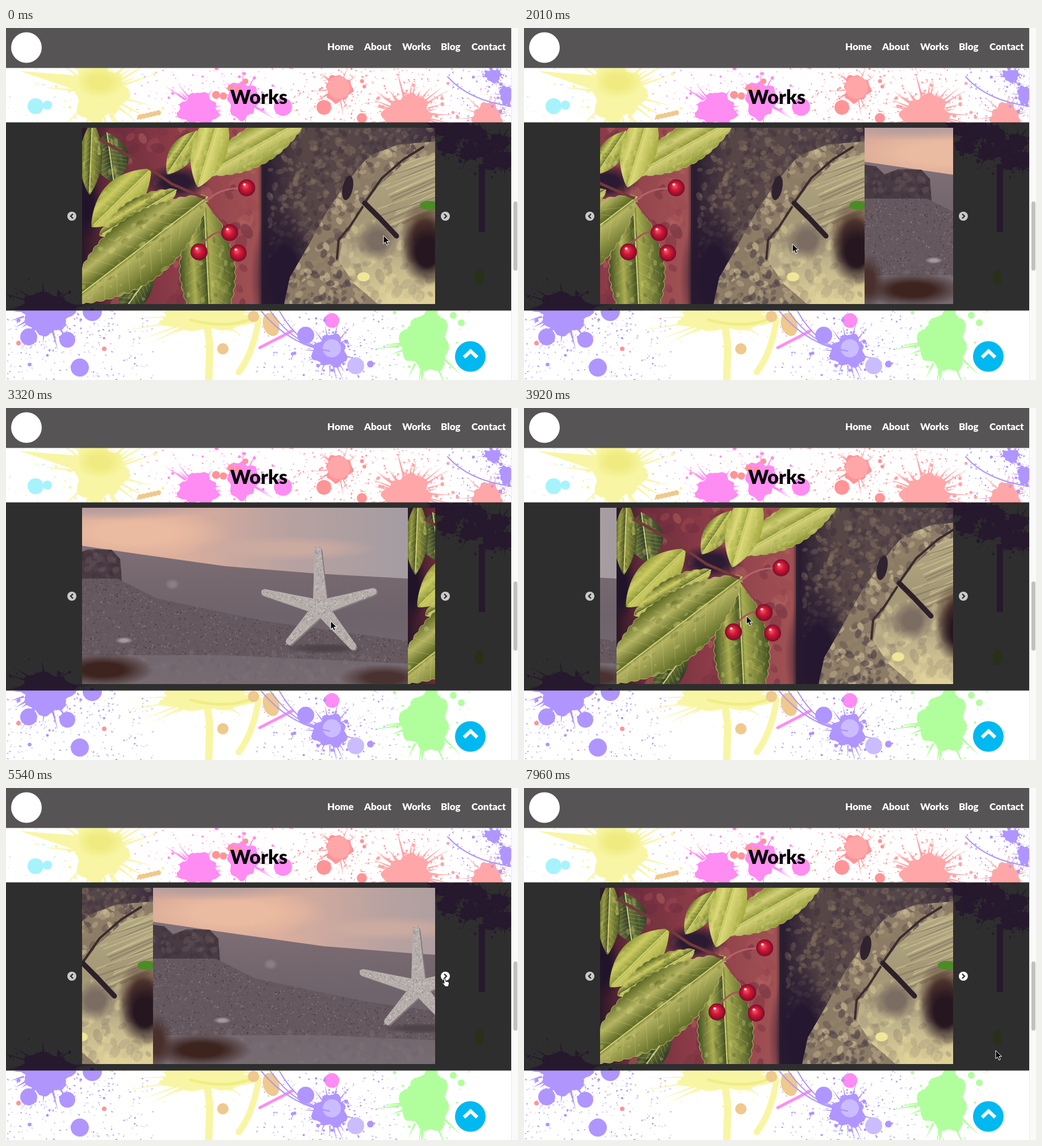
Recreate the animation shown at these times as an HTML page with a canvas. Size 902x621 px, loop 8 s.

```html
<!DOCTYPE html>
<html lang="en">
<head>
<meta charset="utf-8">
<title>Works</title>
<style>
  html, body { margin: 0; width: 100%; height: 100%; overflow: hidden; background: #fff; }
  canvas, svg { position: absolute; left: 0; top: 0; display: block; }
  text { font-family: Lato, "Open Sans", sans-serif; font-weight: 900; }
  .nav { font-size: 17px; fill: #fff; }
</style>
</head>
<body>
<canvas id="stage" width="902" height="621"></canvas>
<svg width="902" height="621" viewBox="0 0 902 621">
  <rect width="890" height="70.500" fill="#565454"/>
  <circle cx="36" cy="34.500" r="27" fill="#fff"/>
  <g class="nav">
    <text x="566" y="39">Home</text>
    <text x="631" y="39">About</text>
    <text x="698" y="39">Works</text>
    <text x="766" y="39">Blog</text>
    <text x="820" y="39">Contact</text>
  </g>
  <text x="445.500" y="133.500" font-size="34" text-anchor="middle">Works</text>
  <g fill="none" stroke="#2e2e2e" stroke-width="2.400">
    <circle cx="116" cy="332" r="8" fill="#cbcbcb" stroke="none"/>
    <path d="M118 328l-4 4 4 4"/>
    <circle id="next" cx="774" cy="332" r="8" stroke="none"/>
    <path d="M772 328l4 4-4 4"/>
  </g>
  <circle cx="818" cy="579.500" r="27" fill="#00b9f0"/>
  <path d="M807 581l11.500-11 11.500 11" fill="none" stroke="#fff" stroke-width="6"/>
  <rect x="890" width="12" height="621" fill="#fafafa"/>
  <rect x="890" width="1" height="621" fill="#ebebeb"/>
  <rect x="894" y="306" width="7" height="122" rx="3.500" fill="#c1c1c1"/>
  <path id="arrow" d="M0 0v14.500l3.300-3 2.400 5.500 2.600-1.100-2.400-5.400h4.600z" fill="#000" stroke="#fff"/>
  <path id="hand" d="M2 1q1.500-1.500 2.500 0l1 5 5 1q1.500 1 1 4l-1.500 4.500h-5l-5-6q0-2 3 0z" fill="#fff" stroke="#111"/>
</svg>
<script>
const $ = id => document.getElementById(id);
const TAU = Math.PI * 2;
let g, seed;
const rand = () => (seed = seed * 16807 % 2147483647) / 2147483647;
const pick = list => list[Math.floor(rand() * list.length)];
const mix = (a, b, k) => a + (b - a) * k;

function layer(w, h, start, draw) {
  const canvas = document.createElement('canvas');
  canvas.width = w;
  canvas.height = h;
  g = canvas.getContext('2d');
  g.lineCap = g.lineJoin = 'round';
  seed = start;
  draw();
  return canvas;
}
function trace(p) {
  g.beginPath();
  for (let i = 0; i < p.length; i += 2) g.lineTo(p[i], p[i + 1]);
  g.closePath();
}
function inside(p, draw) {
  g.save();
  trace(p);
  g.clip();
  draw();
  g.restore();
}
function box(color, x, y, w, h) {
  g.fillStyle = color;
  g.fillRect(x, y, w, h);
}
function oval(color, x, y, rx, ry = rx, turn = 0) {
  g.fillStyle = color;
  g.beginPath();
  g.ellipse(x, y, rx, ry, turn, 0, TAU);
  g.fill();
}
function line(color, width, ...p) {
  g.strokeStyle = color;
  g.lineWidth = width;
  g.beginPath();
  for (let i = 0; i < p.length; i += 2) g.lineTo(p[i], p[i + 1]);
  g.stroke();
}
function curve(color, width, a, b, c, d, e, f) {
  g.strokeStyle = color;
  g.lineWidth = width;
  g.beginPath();
  g.moveTo(a, b);
  g.quadraticCurveTo(c, d, e, f);
  g.stroke();
}
function specks(x, y, w, h, n, r, colors, alpha = 1) {
  g.globalAlpha = alpha;
  while (n--) {
    const s = r * (.4 + rand() * .6);
    oval(pick(colors), x + w * rand(), y + h * rand(), s, s * .65, rand() * 3);
  }
  g.globalAlpha = 1;
}
function fade(x0, y0, x1, y1, ...stops) {
  const grad = g.createLinearGradient(x0, y0, x1, y1);
  for (let i = 0; i < stops.length; i += 2) grad.addColorStop(stops[i], stops[i + 1]);
  return grad;
}
function glow(color, x, y, rx, ry) {
  g.save();
  g.translate(x, y);
  g.scale(rx, ry);
  const grad = g.createRadialGradient(0, 0, .4, 0, 0, 1);
  grad.addColorStop(0, color);
  grad.addColorStop(1, color + '00');
  box(grad, -1, -1, 2, 2);
  g.restore();
}

// Wobbly blot with loose drops and thin rays
function splat(color, x, y, rx, ry, drops = 40, rays = 10) {
  const at = (a, d) => [x + Math.cos(a) * rx * d, y + Math.sin(a) * ry * d];
  const rim = [];
  for (let i = 0; i < 90; i++) {
    const a = i / 90 * TAU;
    rim.push(...at(a, .88 + .1 * Math.sin(a * 3 + x) + .07 * Math.sin(a * 8 + y) + .05 * rand()));
  }
  g.fillStyle = color;
  trace(rim);
  g.fill();
  while (rays--) {
    const a = rand() * TAU;
    trace([...at(a - .05, .8), ...at(a, 1.1 + rand()), ...at(a + .05, .8)]);
    g.fill();
  }
  while (drops--) oval(color, ...at(rand() * TAU, 1 + 1.4 * rand() ** 1.5), .6 + 3 * rand() ** 4);
}

const page = layer(902, 621, 77, () => {
  const yellow = '#f8f6a4', pink = '#ff8cf3', red = '#ff9497', rose = '#ffa6a8',
        purple = '#b095ff', lilac = '#cbbcff', green = '#b1ff9c', tan = '#efc98d', cyan = '#a7f3fc';
  box('#fff', 0, 0, 902, 621);
  specks(0, 71, 240, 96, 60, 1.6, [yellow, cyan]);
  specks(220, 71, 280, 96, 90, 1.6, [pink, red]);
  specks(500, 71, 270, 96, 200, 2, [red, rose]);
  specks(780, 71, 110, 96, 100, 2, [purple]);
  specks(0, 499, 260, 122, 220, 2, [purple, lilac]);
  specks(440, 499, 250, 122, 200, 2, [purple, lilac]);

  splat(yellow, 165, 114, 50, 55, 90, 30);
  glow('#f0eb80', 165, 95, 45, 30);
  trace([25, 76, 128, 84, 130, 112]);
  g.fillStyle = yellow;
  g.fill();
  oval(cyan, 52, 138, 14);
  oval(cyan, 73, 136, 8);
  for (let i = 0; i < 6; i++) oval(tan, 236 + 6.5 * i, 157 - 1.5 * i, 4.5);

  splat(pink, 339, 143, 38, 30);
  splat(pink, 417, 127, 30, 36);
  oval(pink, 488, 139, 16);
  for (let i = 0; i < 5; i++) oval(red, 370 + 13 * i, 118 - 6 * i + i % 2 * 8, 7 - i * .5);
  splat(red, 586, 107, 25, 26, 40);
  oval(rose, 586, 105, 20);
  oval(red, 560, 140, 13);
  oval(red, 627, 159, 9);
  splat(rose, 709, 152, 46, 36, 90, 45);
  splat(rose, 848, 155, 28, 24, 20);
  splat(purple, 858, 84, 16, 12);
  splat(purple, 882, 118, 14, 18);
  curve(purple, 2, 778, 86, 815, 128, 890, 138);

  splat(purple, 72, 497, 54, 44, 90, 30);
  oval(purple, 40, 545, 15);
  oval(purple, 130, 599, 16);
  oval(purple, 108, 550, 14);
  oval(purple, 152, 500, 17);
  oval(red, 22, 556, 4);
  oval(red, 173, 566, 4);
  splat(yellow, 352, 508, 85, 30, 60, 16);
  line(yellow, 13, 355, 530, 359, 560, 357, 621);
  curve(yellow, 11, 445, 515, 435, 575, 410, 607);
  curve('#f0ed86', 5, 325, 515, 390, 532, 435, 512);
  oval(tan, 382, 566, 10);
  oval(tan, 467, 523, 14, 21, -.3);
  oval(tan, 436, 509, 10);
  line(pink, 5, 447, 564, 505, 534);
  oval(pink, 574, 516, 13);
  splat(purple, 571, 570, 33, 31, 90, 16);
  oval(lilac, 574, 565, 16);
  oval(lilac, 616, 596, 15);
  oval(purple, 528, 542, 15);
  oval(purple, 642, 593, 6);
  for (let i = 0; i < 3; i++) curve(purple, 2, 450 + 16 * i, 500, 500 + 8 * i, 560, 570, 570);
  splat(green, 740, 553, 46, 57, 60);
  oval(green, 788, 507, 6);
  oval(green, 802, 520, 6);

  const shade = '#26182d';
  box('#2e2e2e', 0, 166.5, 890, 332);
  inside([0, 167, 890, 167, 890, 498, 0, 498], () => {
    for (let i = 0; i < 10; i++) splat(shade, 765 + 13 * i, mix(170, 240, rand()), 19, 17, 25);
    box(shade, 833, 240, 11, 120);
    splat(shade, 70, 492, 52, 26, 70, 25);
    oval('#283018', 834, 440, 8, 14);
  });
});

// Leaf from base to tip: light along the rib, dark at the rim
function leaf(x, y, x2, y2, width, light, dark, teeth = 0) {
  const dx = x2 - x, dy = y2 - y, len = Math.hypot(dx, dy);
  const at = (t, d) => [x + dx * t - dy / len * d, y + dy * t + dx / len * d];
  const half = t => width / 2 * Math.abs(Math.sin(Math.PI * t)) ** .8;
  const rim = [];
  for (let i = 0; i < 240; i++) {
    const t = i < 120 ? i / 120 : 2 - i / 120;
    rim.push(...at(t, (i < 120 ? 1 : -1) * (half(t) + teeth * Math.abs(Math.sin(t * len / 5)))));
  }
  g.fillStyle = fade(...at(.5, -width / 2), ...at(.5, width / 2), 0, dark, .45, light, .52, dark, .75, light, 1, dark);
  trace(rim);
  g.fill();
  inside(rim, () => {
    g.globalAlpha = .3;
    for (let i = 0; i < len / 2; i++)
      oval(pick([light, dark, '#d8d684']), ...at(rand(), (rand() - .5) * width), 9 * rand(), 4 * rand(), Math.atan2(dy, dx));
    g.globalAlpha = 1;
    for (let t = .1; t < .85; t += .08) for (const side of [1, -1])
      line('#dddc8a50', 1, ...at(t, 0), ...at(t + .1, side * half(t) * .85));
  });
  if (teeth) line('#b9b570', 1, ...rim);
  line('#d3d27a', 2, x, y, ...at(.96, 0));
}
function berry(x, y) {
  const grad = g.createRadialGradient(x - 3, y - 4, 1, x, y, 15);
  grad.addColorStop(0, '#f0596a');
  grad.addColorStop(.4, '#d41a36');
  grad.addColorStop(1, '#7c0a2a');
  oval(grad, x, y, 15);
  oval('#ffdce0', x - 4, y - 6, 2.5, 2);
}

const berries = layer(622, 311, 31, () => {
  g.translate(-134, -176);
  box(fade(134, 0, 450, 0, 0, '#2b1826', .15, '#692b3b', .5, '#8b3b47', 1, '#a15354'), 134, 176, 316, 311);
  specks(180, 176, 262, 311, 130, 16, ['#9d4850', '#7b3341', '#b1625e', '#6b2c3d'], .5);
  box(fade(444, 0, 756, 0, 0, '#2a1b3000', .04, '#2a1b30', .25, '#564646', .8, '#55464a', 1, '#3a2c3e'), 444, 176, 312, 311);
  specks(465, 176, 291, 230, 750, 8, ['#76645a', '#4a3a43', '#8a7560', '#3c2e3a'], .45);
  glow('#25172f', 490, 440, 60, 130);
  glow('#2b1b32', 300, 272, 60, 32);
  glow('#21142a', 140, 315, 28, 60);

  inside([490, 487, 500, 440, 532, 385, 562, 330, 598, 275, 640, 225, 690, 206, 756, 200, 756, 487], () => {
    box('#8c7c66', 480, 176, 276, 311);
    specks(485, 195, 271, 295, 800, 9, ['#b5a482', '#51434a', '#cdbd94', '#6c5b52', '#94846a'], .6);
    inside([756, 222, 705, 235, 655, 280, 630, 315, 592, 380, 586, 410, 612, 450, 655, 487, 756, 487], () => {
      box(fade(640, 230, 670, 487, 0, '#b3a982', .4, '#a39776', .7, '#bdb18a', 1, '#ded097'), 580, 200, 176, 287);
      for (let y = 215; y < 340; y += 5)
        line(pick(['#cdc29190', '#7f735e90', '#e0d59c70']), 2.5, 650 + rand() * 40, y + 24, 770, y - 16);
      specks(590, 340, 166, 147, 120, 13, ['#c7bb90', '#a59a7d', '#e0d49b', '#91846f'], .4);
      glow('#7c6d62', 655, 375, 40, 38);
      glow('#54382f', 738, 365, 45, 60);
      glow('#26161f', 742, 395, 48, 62);
      oval('#f0e698', 630, 439, 11, 8);
    });
    oval('#4b8c25', 745, 313, 16, 8);
  });
  line('#3a2b2d', 4, 735, 210, 700, 232, 662, 265, 634, 305);
  line('#2d2029', 9, 632, 309, 658, 335, 688, 367);
  line('#3d2d30', 4, 628, 316, 606, 350, 586, 374, 583, 407);
  oval('#30222f', 602, 282, 9, 22, .2);

  const rim = '#606c26', gold = '#cccb62', olive = '#a9ac50';
  leaf(178, 185, 190, 272, 65, '#66713a', '#333f28');
  leaf(152, 164, 147, 294, 40, '#959a40', '#485128');
  leaf(262, 424, 195, 515, 44, '#5b6630', '#313d24');
  leaf(335, 182, 284, 258, 42, gold, '#6d7a2e');
  leaf(530, 158, 350, 258, 66, '#d3d078', '#929a3a', 2);
  leaf(380, 140, 338, 281, 64, '#dcd979', '#a4aa40');
  leaf(255, 249, 151, 351, 67, gold, '#919b39');
  leaf(300, 286, 165, 366, 48, gold, rim, 2);
  leaf(349, 308, 361, 550, 94, olive, '#465424', 3);
  leaf(355, 298, 112, 484, 112, '#b5b462', rim, 3);

  line('#74393b', 5, 166, 197, 240, 239, 292, 275, 349, 300);
  curve('#b5636b', 3, 354, 304, 378, 282, 412, 283);
  line('#923f49', 3, 354, 308, 370, 330, 389, 352);
  curve('#aa535d', 3, 341, 388, 358, 362, 380, 359);
  line('#a94c57', 3, 377, 361, 405, 389);
  berry(424, 282);
  berry(394, 361);
  berry(409, 397);
  berry(340, 395);
});

const beach = layer(622, 311, 53, () => {
  box(fade(0, 0, 622, 0, 0, '#d9a997', .35, '#dcae9d', .65, '#b9a2a0', 1, '#a49ca2'), 0, 0, 622, 311);
  glow('#eabba0', 140, 45, 170, 45);
  glow('#b89f9e', 90, -5, 220, 28);
  glow('#cbaaa0', 400, 72, 170, 22);
  inside([0, 60, 150, 82, 300, 103, 460, 116, 622, 125, 622, 311, 0, 311], () => {
    box(fade(0, 65, 0, 311, 0, '#817078', .2, '#77696f', .5, '#6f636b', 1, '#776b72'), 0, 0, 622, 311);
    glow('#8c7e84', 207, 135, 13, 10);
  });
  inside([0, 65, 20, 68, 35, 82, 60, 73, 100, 74, 115, 90, 119, 140, 0, 140], () => {
    box('#493b43', 0, 0, 130, 150);
    specks(0, 65, 120, 75, 90, 8, ['#5a4a50', '#3e3039', '#6a595e'], .4);
  });
  inside([0, 125, 110, 125, 180, 160, 370, 200, 622, 235, 622, 275, 300, 260, 0, 260], () => {
    box('#65585f', 0, 0, 622, 311);
    specks(0, 120, 622, 155, 3200, 1.8, ['#463a43', '#8b7d81', '#55484f', '#75686e'], .75);
  });
  specks(0, 255, 622, 56, 130, 8, ['#7b6f77', '#6c6069', '#83767c'], .35);
  glow('#a6999d', 122, 234, 16, 6);
  glow('#3d241f', 85, 286, 90, 30);
  glow('#49302d', 5, 272, 30, 50);
  glow('#493230', 580, 300, 80, 24);

  glow('#4f434a', 475, 248, 75, 10);
  const tips = [[463, 72], [368, 149], [563, 147], [412, 237], [526, 246]];
  for (const [color, shift] of [['#82787c', 2], ['#b6aeab', 0]])
    for (const [x, y] of tips) for (let t = 0; t <= 1; t += .02)
      oval(color, mix(468, x, t) + shift, mix(176, y, t) + shift, mix(13, 6, t));
  for (const [x, y] of tips) for (let t = 0; t < 1; t += .012) {
    const w = mix(20, 10, t);
    oval(pick(['#d0c9c4', '#989091']), mix(468, x, t) + (rand() - .5) * w, mix(176, y, t) + (rand() - .5) * w, 1);
  }
});

// The picture moves in ticks within each [start, end] and rests between
const LOOP = 8000, TICK = 148;
const runs = [[0, 0], [500, 1420], [1570, 2460], [2700, 3020], [3320, 3920], [4180, 4360],
  [4510, 4950], [5390, 5890], [6820, 7370], [7810, 7960]];
// start, end, x, y
const trips = [[400, 950, 541, 368], [950, 1270, 626, 374], [1500, 2125, 365, 386], [2600, 3020, 620, 378],
  [3250, 3585, 392, 367], [3920, 4360, 641, 343], [4360, 4950, 769, 335], [7700, 7960, 831, 463]];

const ramp = x => Math.min(1, Math.max(0, x));
// cubic-bezier(.25, .1, .25, 1)
function ease(x) {
  x = ramp(x);
  let lo = 0, hi = 1, s;
  for (let i = 0; i < 24; i++) {
    s = (lo + hi) / 2;
    if (.75 * s * (1 - s) + s ** 3 < x) lo = s; else hi = s;
  }
  return .3 * s * (1 - s) ** 2 + 3 * s * s * (1 - s) + s ** 3;
}
// start, duration, distance, curve: two drags with release, then two clicks
const moves = [[1500, 625, 267, ramp], [2125, 500, 355, ease], [3250, 335, 228, ramp],
  [3585, 500, 394, ease], [5290, 500, 622, ease], [6755, 500, 622, ease]];
const scroll = t => moves.reduce((sum, [start, time, dist, f]) => sum + dist * f((t - start) / time), 0);

function snap(t) {
  const [start, end] = runs.filter(r => r[0] <= t).pop();
  return t >= end ? end : start + Math.floor((t - start) / TICK) * TICK;
}
function pointer(t) {
  let x = 665, y = 366;
  for (const [start, end, toX, toY] of trips) {
    const k = ramp((t - start) / (end - start));
    x = mix(x, toX, k);
    y = mix(y, toY, k);
  }
  return [Math.round(x), Math.round(y)];
}

const view = $('stage').getContext('2d');
const began = performance.now();
function frame(now) {
  const t = snap(Math.max(0, now - began) % LOOP);
  const x = Math.round(scroll(t)) % 1244, first = x < 622;
  view.drawImage(page, 0, 0);
  view.save();
  view.beginPath();
  view.rect(134, 176, 622, 311);
  view.clip();
  view.drawImage(first ? berries : beach, 134 - x % 622, 176);
  view.drawImage(first ? beach : berries, 756 - x % 622, 176);
  view.restore();

  const hand = t >= 4950 && t < 7810;
  $('next').setAttribute('fill', t >= 4950 ? '#fff' : '#cbcbcb');
  $('arrow').style.display = hand ? 'none' : '';
  $('hand').style.display = hand ? '' : 'none';
  $(hand ? 'hand' : 'arrow').setAttribute('transform', `translate(${pointer(t)})`);
  requestAnimationFrame(frame);
}
requestAnimationFrame(frame);
</script>
</body>
</html>
```
